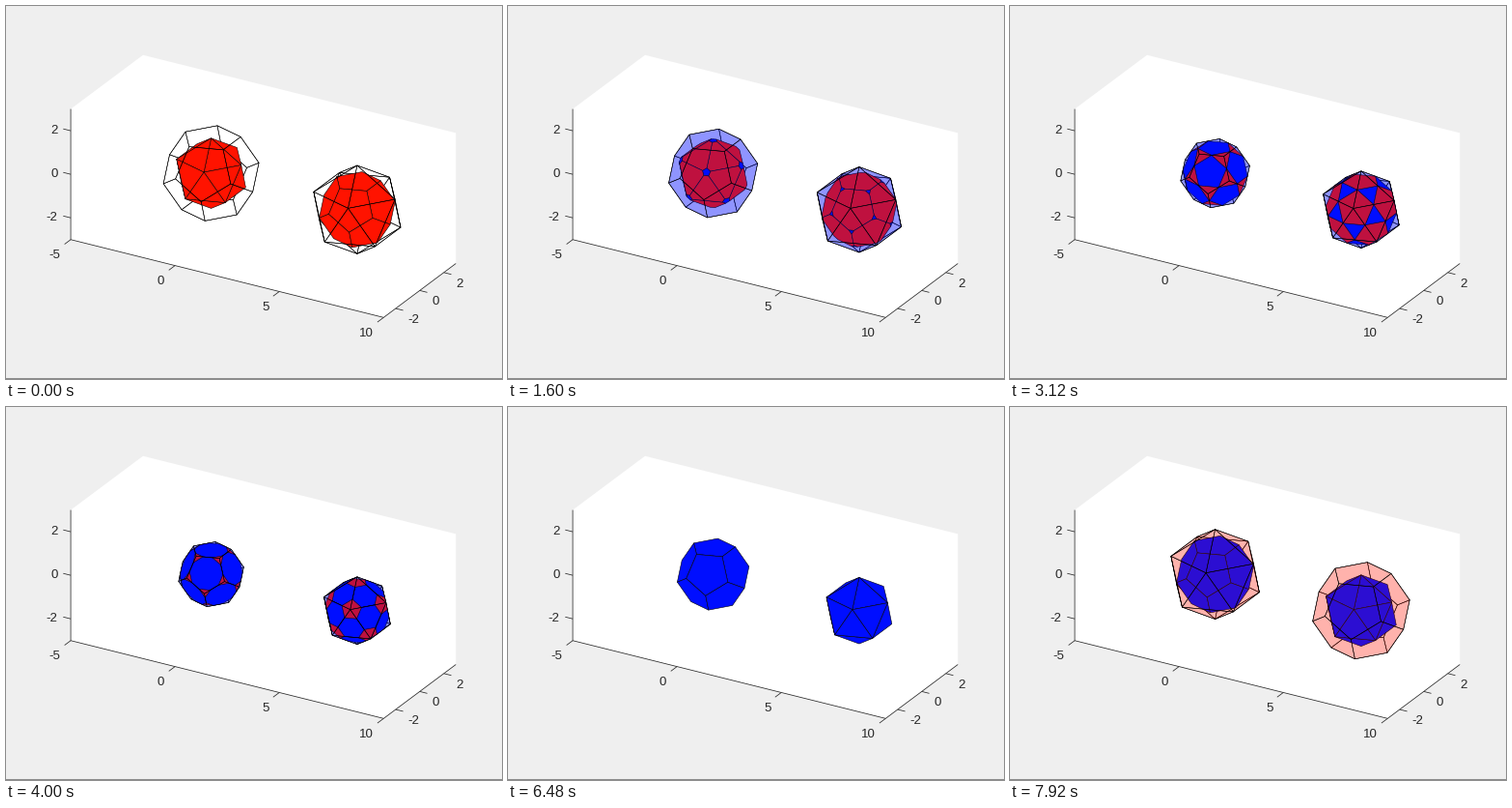
Write a matplotlib script that moves like this. It is 514 px wide and 386 px high and loops after 8 s.

```python
import itertools

import matplotlib.pyplot as plt
import numpy as np
from matplotlib.animation import FuncAnimation
from matplotlib.collections import PolyCollection
from matplotlib.patches import Circle, Ellipse, Polygon, Rectangle, RegularPolygon

W, H = 514, 386
FRAMES, STEP = 100, 80

# Orthographic camera
SCALE = 24.96
AZ, EL = np.radians(30), np.radians(25.5)
ORIGIN = np.array([212.6, 173.1])
RIGHT = np.array([np.cos(AZ), np.sin(AZ), 0])
UP = np.array([-np.sin(AZ) * np.sin(EL), np.cos(AZ) * np.sin(EL), np.cos(EL)])
VIEW = np.cross(RIGHT, UP)

RED, BLUE = (1, 0.075, 0), (0, 0.055, 1)
INK = (0.15, 0.15, 0.15)
GRAY = "#6e6e6e"
EDGE_PT = 0.4
GLASS = 0.25

# Ratios shared by the icosahedron and the dodecahedron
PHI = (1 + np.sqrt(5)) / 2
INR = np.sqrt((5 + 2 * np.sqrt(5)) / 15)
MID = np.sqrt(5 + np.sqrt(5)) / np.sqrt(10) * np.sqrt(3) / PHI ** 2 / np.sqrt(2) * np.sqrt(2)
MID = (PHI / np.sqrt(PHI + 2)) / (PHI / np.sqrt(3))
SMALL, LARGE = 1.612, 1.638


def project(points):
    p = np.atleast_2d(np.asarray(points, float))
    return ORIGIN + SCALE * np.column_stack([p @ RIGHT, -(p @ UP)])


def icosa_vertices():
    pts = [(0, 0, 1), (0, 0, -1)]
    for k in range(5):
        for sign, turn in ((1, 0), (-1, 36)):
            a = np.radians(72 * k + turn)
            pts.append((2 * np.cos(a), 2 * np.sin(a), sign))
    pts = np.array(pts, float)
    return pts / np.linalg.norm(pts, axis=1)[:, None]


def face_directions(verts):
    out = []
    for tri in itertools.combinations(verts, 3):
        if all(a @ b > 0.4 for a, b in itertools.combinations(tri, 2)):
            n = sum(tri)
            out.append(n / np.linalg.norm(n))
    return np.array(out)


def clip(poly, n, d):
    side = poly @ n - d
    if (side <= 1e-9).all():
        return poly
    out = []
    for i in range(len(poly)):
        j = (i + 1) % len(poly)
        if side[i] <= 0:
            out.append(poly[i])
        if (side[i] <= 0) != (side[j] <= 0):
            t = side[i] / (side[i] - side[j])
            out.append(poly[i] + t * (poly[j] - poly[i]))
    return np.array(out)


def face(i, normals, dist):
    """Polygon that the half-spaces leave on plane i, or None."""
    n = normals[i]
    u = np.cross(n, (0.31, 0.52, 0.79))
    u /= np.linalg.norm(u)
    v = np.cross(n, u)
    poly = n * dist[i] + 5 * np.array([u + v, v - u, -u - v, u - v])
    for j in range(len(normals)):
        if j != i:
            poly = clip(poly, normals[j], dist[j])
            if len(poly) < 3:
                return None
    return poly if np.ptp(poly, axis=0).max() > 0.02 else None


class Solid:
    """Regular solid with its face planes at distance 1."""

    def __init__(self, normals):
        self.normals = normals
        ones = np.ones(len(normals))
        self.faces = [face(i, normals, ones) for i in range(len(normals))]
        self.front = normals @ VIEW > 0

    def half(self, dist, front):
        return [f * dist for f, s in zip(self.faces, self.front) if s == front]


ICO_DIRS = icosa_vertices()
DODECA = Solid(ICO_DIRS)
ICOSA = Solid(face_directions(ICO_DIRS))

# x position, first solid, second solid, size ratio at the rectified shape
PAIRS = ((0, DODECA, ICOSA, MID), (7, ICOSA, DODECA, 1 / MID))


def common_core(blue, a, red, b):
    """Front faces of the part that lies in both solids."""
    normals = np.vstack([blue.normals, red.normals])
    dist = np.repeat([a, b], [len(blue.normals), len(red.normals)])
    for i, n in enumerate(normals):
        if n @ VIEW > 0:
            poly = face(i, normals, dist)
            if poly is not None:
                yield poly, BLUE if i < len(blue.normals) else RED


def pair_polys(s, blue, red, ratio):
    """Polygons with their colours from back to front."""
    if s < 52:
        shell, color = blue, BLUE
        dist = SMALL * np.interp(s, [11, 31, 51], [1, INR * ratio, INR ** 2])
        alpha = GLASS * min(s / 10, 1)
        core = list(common_core(blue, dist, red, INR * SMALL))
    else:
        shell, color = red, RED
        dist = np.interp(s, [52, 71], [INR * SMALL, LARGE])
        core = [(f, BLUE) for f in blue.half(INR * dist, True)]
        if s < 72:
            return core
        alpha = GLASS * (s - 72) / 10
    tint = (*color, alpha)
    back = [(f, tint) for f in shell.half(dist, False)]
    front = [(f, tint) for f in shell.half(dist, True)]
    return back + core + front


fig = plt.figure(figsize=(W / 100, H / 100), dpi=100, facecolor="#efefef")
ax = fig.add_axes([0, 0, 1, 1])
ax.set_xlim(0, W)
ax.set_ylim(H, 0)
ax.axis("off")


def stroke(xs, ys, color=INK, pt=0.55):
    return ax.plot(xs, ys, color=color, lw=pt, solid_capstyle="butt")[0]


def tick(value, point, direction, offset, ha):
    p = project(point)[0]
    d = project(direction)[0] - ORIGIN
    q = p + 8 * d / np.hypot(*d)
    stroke(*zip(p, q))
    x, y = p + offset
    ax.text(x, y + 4.7, str(value), ha=ha, va="baseline", color=INK,
            family="Liberation Sans", fontsize=9.5)


def draw_axes():
    line = [(-5, -3, 3), (-5, -3, -3), (10, -3, -3), (10, 3, -3)]
    hull = line + [(10, 3, 3), (-5, 3, 3)]
    ax.add_patch(Polygon(project(hull), fc="white", ec="none", zorder=0))
    stroke(*project(line).T)
    for x in range(-5, 11, 5):
        tick(x, (x, -3, -3), (0, -1, 0), (-10.8, 14.8), "right")
    for v in range(-2, 3, 2):
        tick(v, (10, v, -3), (1, 0, 0), (12.6, 10), "left")
        tick(v, (-5, -3, v), (-1, 0, 0), (-13.5, -2.1), "right")
    ax.add_patch(Rectangle((0, H - 1), W, 1, fc="#8c8c8c", ec="none"))


def draw_toolbar(y=41, left=346, gap=18.4):
    parts = []
    brush, tip, turn, hand, zoom_in, zoom_out, home = left + gap * np.arange(7)

    def line(x1, y1, x2, y2, pt=0.8):
        parts.append(stroke([x1, x2], [y1, y2], GRAY, pt))

    def shape(patch, fc="none"):
        patch.set(fc=fc, ec=GRAY, lw=0.8)
        parts.append(ax.add_patch(patch))

    line(brush - 4, y + 3, brush + 3, y - 5, 2)
    line(brush - 7, y + 6, brush + 7, y + 6)
    shape(Rectangle((tip - 5, y - 6), 11, 12))
    for dy in (-2, 2):
        line(tip - 3, y + dy, tip + 4, y + dy)
    shape(Circle((turn, y), 6.3))
    shape(Rectangle((turn - 2.5, y - 2.5), 5, 5), GRAY)
    shape(Ellipse((hand, y + 3), 9, 7))
    for k in range(4):
        line(hand - 4 + 2.7 * k, y, hand - 5 + 3.2 * k, y - 6 + (k - 1.5) ** 2 / 2, 1.2)
    for x in (zoom_in, zoom_out):
        shape(Circle((x, y - 1), 5))
        line(x + 3.6, y + 2.6, x + 8, y + 7)
        line(x - 2.7, y - 1, x + 2.7, y - 1)
    line(zoom_in, y - 3.7, zoom_in, y + 1.7)
    shape(RegularPolygon((home, y - 1), 3, radius=6, orientation=np.pi))
    shape(Rectangle((home - 4.5, y), 9, 6.5))
    return parts


draw_axes()
toolbar = draw_toolbar()
solids = PolyCollection([], edgecolors=[(0, 0, 0, 1)], linewidths=EDGE_PT,
                        joinstyle="round", zorder=3)
ax.add_collection(solids, autolim=False)


def update(frame):
    s = frame - (frame + 2) // 5  # every fifth frame holds
    verts, colors = [], []
    for x, blue, red, ratio in PAIRS:
        for poly, color in pair_polys(s, blue, red, ratio):
            verts.append(project(poly + (x, 0, 0)))
            colors.append(color if len(color) == 4 else (*color, 1))
    solids.set_verts(verts)
    solids.set_facecolor(colors)
    for part in toolbar:
        part.set_visible(frame in (10, 11))
    return [solids, *toolbar]


anim = FuncAnimation(fig, update, frames=FRAMES, interval=STEP, repeat=True, repeat_delay=0)
plt.show()
```
